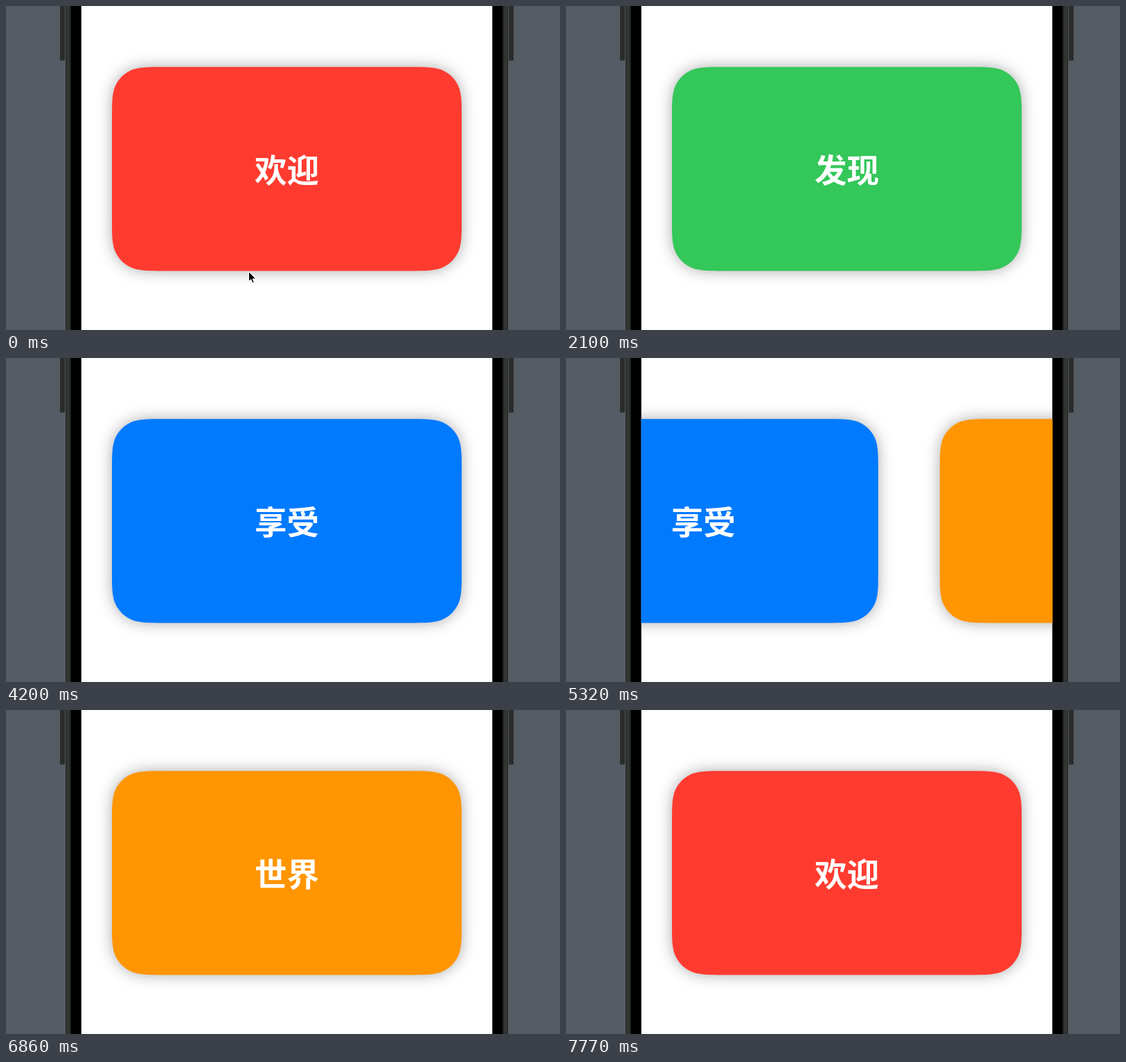
Animation of 800x469 px, one loop 8 s. Source, as an HTML page:

```html
<!DOCTYPE html>
<html lang="zh-CN">
<head>
<meta charset="utf-8">
<title>轮播</title>
<style>
  html, body { margin: 0; width: 100%; height: 100%; overflow: hidden; background: #565c64; }
  svg { display: block; }
  .card { filter: drop-shadow(0 0 10.5px rgba(0, 0, 0, .33)); }
  text {
    font: 700 46.6px "Noto Sans CJK SC", "Noto Sans CJK", sans-serif;
    fill: #fff;
    text-anchor: middle;
  }
  #cursor { animation: hide 8s step-end infinite; }
  @keyframes hide {
    0% { visibility: visible; }
    .875%, 100% { visibility: hidden; }
  }
</style>
</head>
<body>
<svg width="800" height="469" viewBox="0 0 800 469">
  <defs>
    <linearGradient id="rim">
      <stop offset="0" stop-color="#20211f"/>
      <stop offset=".35" stop-color="#383a38"/>
      <stop offset=".75" stop-color="#2f312f"/>
      <stop offset="1" stop-color="#1a1b1a"/>
    </linearGradient>
    <g id="side">
      <rect x="78" y="-10" width="7" height="89" rx="1" fill="#2b2c2b"/>
      <rect x="86" width="7.5" height="469" fill="url(#rim)"/>
      <rect x="93.5" width="16" height="469"/>
    </g>
  </defs>
  <use href="#side"/>
  <use href="#side" transform="matrix(-1 0 0 1 811 0)"/>
  <svg x="108.5" width="594" height="469">
    <rect width="594" height="469" fill="#fff"/>
    <g id="track"></g>
  </svg>
  <path id="cursor" d="M350.5 384.5v14.2l3.2-3 2.3 5.2 2.3-1-2.2-5h4.6z" stroke="#fff"/>
</svg>
<script>
  const PAGE = 594, LOOP = 8000, TICK = 70;
  const pages = [['欢迎', '#ff3b30'], ['发现', '#34c759'], ['享受', '#007aff'], ['世界', '#ff9500']];
  // start, duration, page reached
  const moves = [[990, 403, 1], [3060, 466, 2], [5100, 547, 3], [7090, 640, 0]];
  const track = document.getElementById('track');

  // Rectangle with continuous-curvature corners
  function squircle(x, y, w, h, r) {
    const corner = [
      [1.5287, 0], [1.0885, 0], [.8684, 0], [.6315, .0749], [.3728, .1691],
      [.1691, .3728], [.0749, .6315], [0, .8684], [0, 1.0885], [0, 1.5287]
    ];
    const side = (right, bottom) => {
      const pts = corner.map(([a, b]) => [
        right ? x + w - a * r : x + a * r,
        bottom ? y + h - b * r : y + b * r
      ]);
      return right === bottom ? pts.reverse() : pts;
    };
    const draw = ([first, ...rest]) => `L${first} C${rest.join(' ')}`;
    const path = [side(true, false), side(true, true), side(false, true), side(false, false)];
    return path.map(draw).join(' ').replace('L', 'M') + 'Z';
  }

  const shape = squircle(44.5, 88.2, 505, 295.3, 48.5);
  track.innerHTML = pages.map(([word, color], i) => `
    <g transform="translate(${i * PAGE})">
      <path class="card" d="${shape}" fill="${color}"/>
      <text x="297" y="255.3">${word}</text>
    </g>`).join('');

  function position(t) {
    let at = 0;
    for (const [start, duration, page] of moves) {
      const p = Math.min(1, Math.max(0, (t - start) / duration));
      at += (page - at) * (1 - Math.cos(Math.PI * p)) / 2;
    }
    return at;
  }

  function render(now) {
    const t = Math.floor((now % LOOP) / TICK) * TICK;
    track.setAttribute('transform', `translate(${-PAGE * position(t)})`);
    requestAnimationFrame(render);
  }
  render(performance.now());
</script>
</body>
</html>
```
